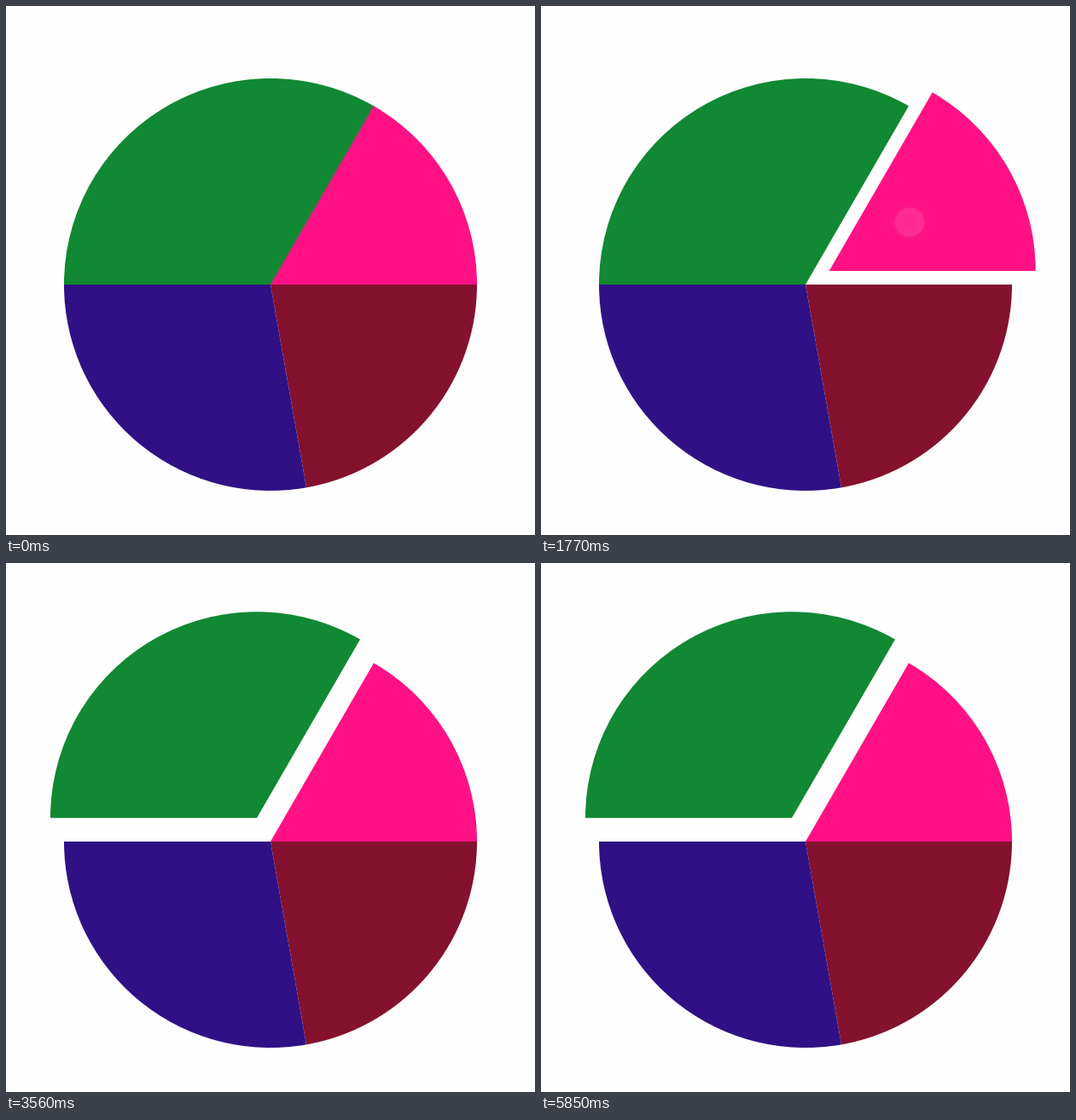
A matplotlib script that plays this animation: 620x621 px, repeating every 5870 ms.

```python
import numpy as np
import matplotlib.pyplot as plt
from matplotlib.animation import FuncAnimation
from matplotlib.patches import Wedge

W, H, DPI = 620, 621, 100
LOOP, STEP = 5870, 10
CX, CY, R, POP = 310, 327, 242, 32
BACK = "#fdfefd"

# name: (start angle, end angle, colour), clockwise with y pointing down
SLICES = {
    "maroon": (0, 80, "#84112d"),
    "purple": (80, 180, "#301185"),
    "green": (180, 300, "#118833"),
    "pink": (300, 360, "#ff1185"),
}

# time in ms, tapped slice, touch position
TAPS = [
    (920, "green", 262, 218),
    (1470, "pink", 432, 254),
    (2020, "maroon", 442, 395),
    (2590, "purple", 238, 422),
    (3160, "green", 256, 216),
    (3720, "purple", 240, 428),
    (4020, "maroon", 424, 435),
    (4320, "pink", 434, 258),
    (4730, "green", 264, 222),
]
HOLD, FADE, TICK = 100, 250, 50
SPOT = 26


def spot_image(n=104):
    """Round white touch mark with a soft violet halo."""
    axis = (np.arange(n) + 0.5) / n * 2 * SPOT - SPOT
    r = np.hypot(axis[:, None], axis[None, :])
    core = np.clip(17.5 - r, 0, 1)
    fill = 0.62 + 0.14 * np.clip(r / 12, 0, 1) ** 2
    halo = 0.42 * np.clip((24 - r) / 7, 0, 1) ** 1.5
    img = np.empty((n, n, 4))
    img[..., :3] = np.array([0.72, 0.55, 0.86])
    img[..., :3] += core[..., None] * (np.array([0.99, 0.98, 0.99]) - img[..., :3])
    img[..., 3] = core * fill + (1 - core) * halo
    return img


def spot_alpha(age):
    if age < HOLD:
        return 1.0
    age = age // TICK * TICK + 10
    return float(np.clip(1 - (age - HOLD) / FADE, 0, 1))


def center(name, out):
    if not out:
        return CX, CY
    a0, a1, _ = SLICES[name]
    mid = np.radians((a0 + a1) / 2)
    return CX + POP * np.cos(mid), CY + POP * np.sin(mid)


fig = plt.figure(figsize=(W / DPI, H / DPI), dpi=DPI, facecolor=BACK)
ax = fig.add_axes([0, 0, 1, 1])
ax.axis("off")

spot = ax.imshow(spot_image(), extent=(0, 1, 0, 1), aspect="auto", zorder=4)
ax.set_xlim(0, W)
ax.set_ylim(H, 0)

wedges = {}
for name, (a0, a1, color) in SLICES.items():
    wedges[name] = Wedge((CX, CY), R, a0, a1, facecolor=color, linewidth=0)
    ax.add_patch(wedges[name])

edge = np.radians(300)
seam, = ax.plot([CX, CX + R * np.cos(edge)], [CY, CY + R * np.sin(edge)],
                color="#884c5c", lw=1.3, solid_capstyle="butt", zorder=3)


def draw(i):
    t = i * STEP
    done = [tap for tap in TAPS if tap[0] <= t]
    start, active, x, y = done[-1] if done else (0, None, 0, 0)
    for name, wedge in wedges.items():
        wedge.set_center(center(name, name == active))
    seam.set_visible(active not in ("green", "pink"))
    alpha = spot_alpha(t - start) if active else 0
    spot.set_visible(alpha > 0)
    if alpha > 0:
        spot.set_extent((x - SPOT, x + SPOT, y + SPOT, y - SPOT))
        spot.set_alpha(alpha)
    return [*wedges.values(), seam, spot]


anim = FuncAnimation(fig, draw, frames=LOOP // STEP, interval=STEP,
                     repeat=True, repeat_delay=0, cache_frame_data=False)
plt.show()
```
